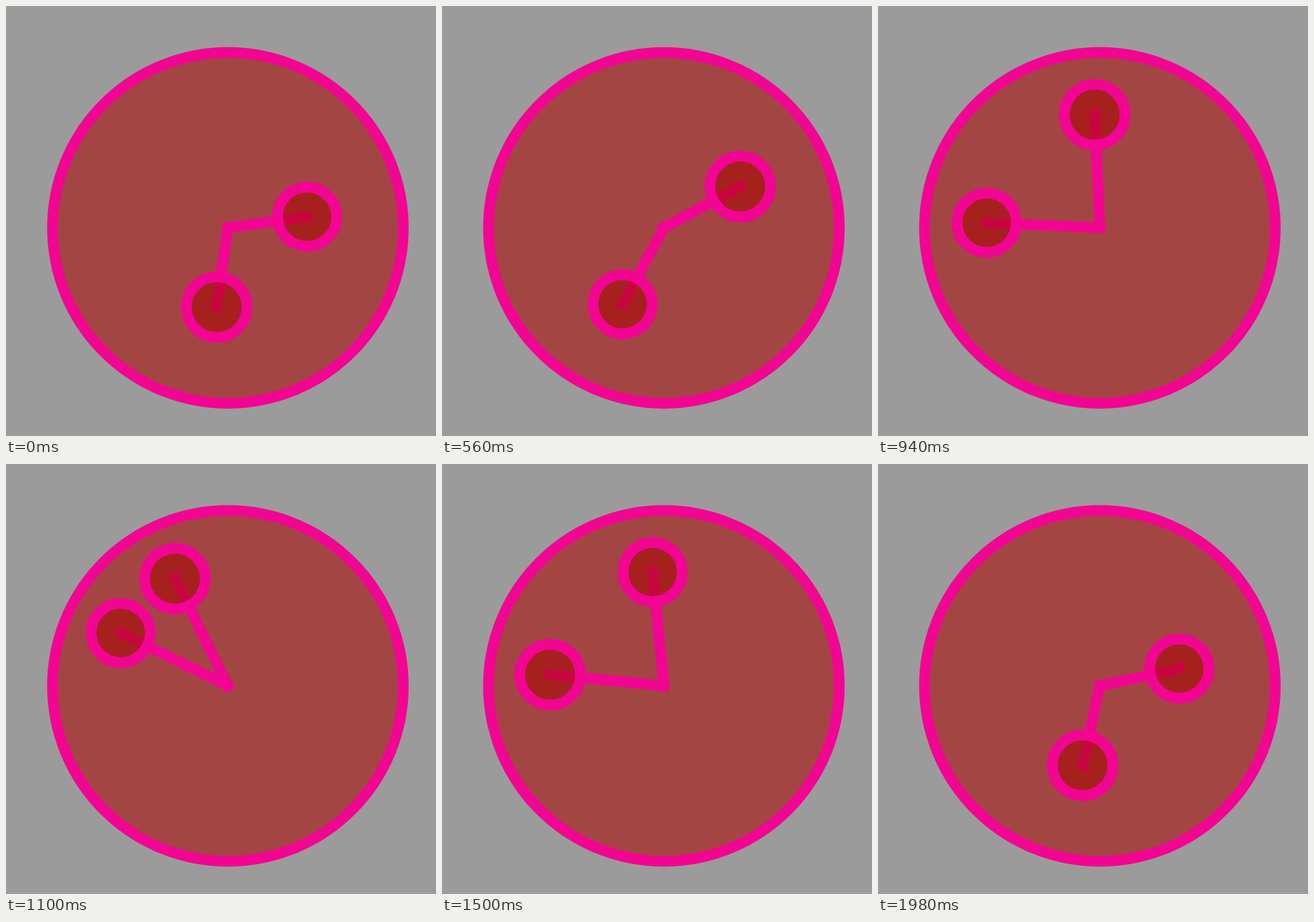
Recreate the animation shown at these times as an HTML page. Size 748 px wide and 748 px high, loop 2 s.

```html
<!DOCTYPE html>
<html lang="en">
<head>
<meta charset="utf-8">
<title>Two orbiting rings</title>
<style>
  html, body { margin: 0; width: 100%; height: 100%; overflow: hidden; background: #9b9b9b; }
  svg { display: block; width: 100%; height: 100%; }
  circle, line { stroke: #f20592; stroke-width: 18.7; stroke-linecap: square; }
  circle { fill: rgba(170, 7, 5, .58); }
</style>
</head>
<body>
<svg viewBox="0 0 748 748">
  <circle cx="386" cy="386" r="305.1"/>
  <line id="armA" x1="385.8" y1="385.8"/>
  <line id="armB" x1="385.8" y1="385.8"/>
  <circle id="ringA" r="51.5"/>
  <circle id="ringB" r="52.8"/>
</svg>
<script>
  const LOOP = 2000, STEP = 20, STEPS = LOOP / STEP;
  const CENTER = 355.9, RADIUS = 168.2;
  const get = id => document.getElementById(id);

  function place(arm, ring, x, y) {
    arm.setAttribute('x2', x);
    arm.setAttribute('y2', y);
    ring.setAttribute('cx', x);
    ring.setAttribute('cy', y);
  }

  const armA = get('armA'), armB = get('armB');
  const ringA = get('ringA'), ringB = get('ringB');
  const start = performance.now();

  function draw() {
    const time = Math.max(0, performance.now() - start) % LOOP;
    const angle = (Math.floor(time / STEP) + 1) / STEPS * 2 * Math.PI;
    const x = CENTER + RADIUS * Math.cos(angle);
    const y = CENTER + RADIUS * Math.sin(angle);
    place(armA, ringA, x, y);
    place(armB, ringB, y, x); // mirrored across the diagonal
    requestAnimationFrame(draw);
  }
  draw();
</script>
</body>
</html>
```
